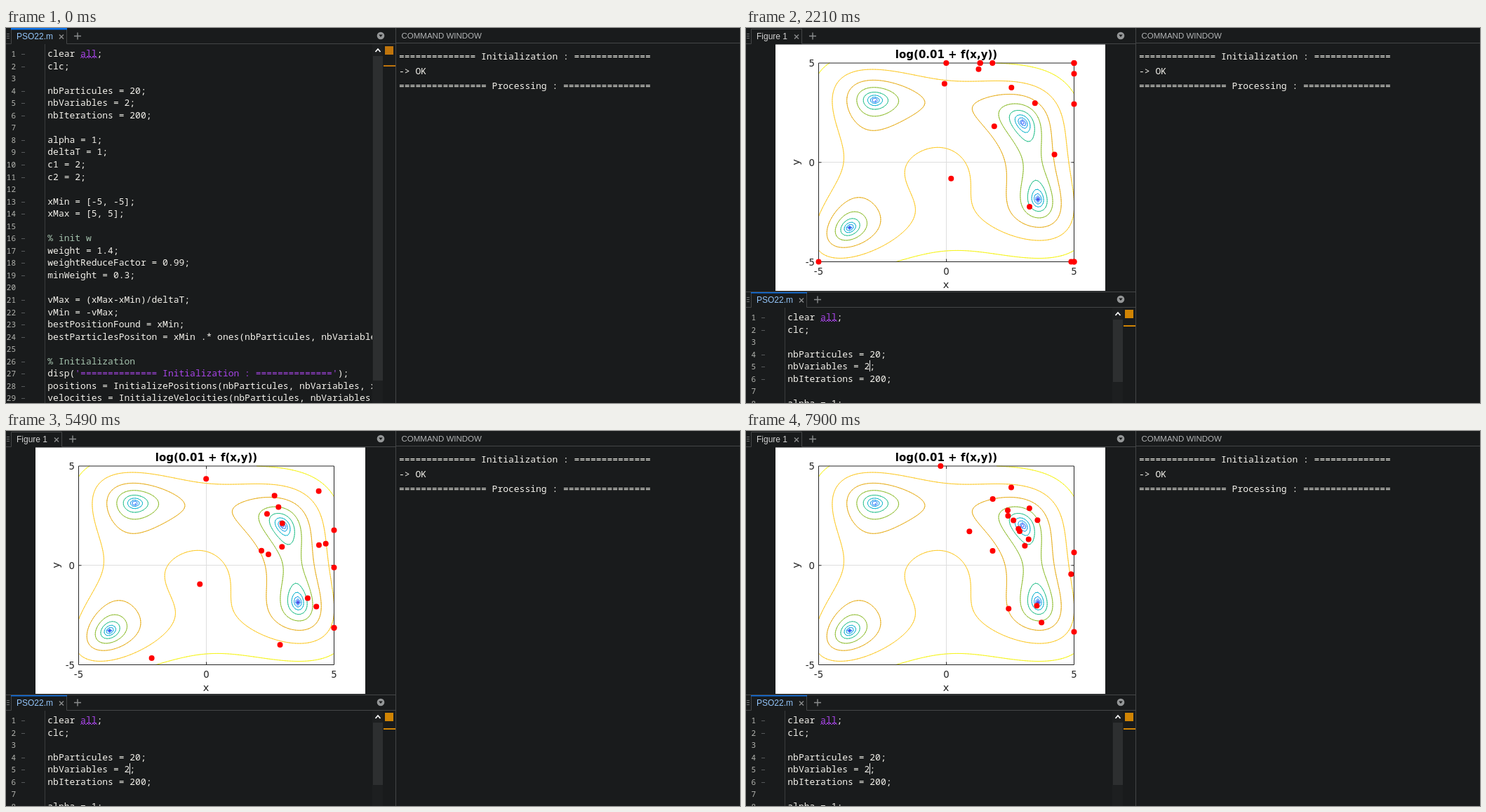
Write an HTML page that moves like this. It is 1046 by 535 pixels and loops after 8 s.

```html
<!DOCTYPE html>
<html lang="en">
<head>
<meta charset="utf-8">
<title>Particle swarm</title>
<style>
html, body { margin: 0; width: 100%; height: 100%; overflow: hidden; background: #191b1c; }
svg { display: block; width: 1046px; height: 535px; }
text { white-space: pre; }
.code { font: 13px "Noto Sans Mono", monospace; fill: #f4f2ec; }
.num { font: 11px "Noto Sans Mono", monospace; fill: #b4b5b0; text-anchor: end; }
.ui { font: 12px "Liberation Sans", sans-serif; fill: #d2d2d2; }
.tick { font: 13.3px "DejaVu Sans", sans-serif; fill: #262626; }
.title { font: bold 15px "DejaVu Sans", sans-serif; fill: #000; text-anchor: middle; }
.edge { fill: none; stroke: #444647; }
.icon { fill: none; stroke: #8b8d8e; stroke-width: 1.4; }
</style>
</head>
<body>
<svg id="stage" viewBox="0 0 1046 535"></svg>
<script>
const LOOP = 8000, DOCK = 930, OPEN = 1120, PLOT = 1228, SWARM = 1336;
const RUN = 1810, STEP = 141.5, BLINK = 600, COUNT = 20;
const BOX = { l: 103.5, r: 467.5, t: 50, b: 333.5 };
const MINIMA = [[3, 2], [3, 2], [3.58, -1.85]];
const CODE = `clear all;
clc;

nbParticules = 20;
nbVariables = 2;
nbIterations = 200;

alpha = 1;
deltaT = 1;
c1 = 2;
c2 = 2;

xMin = [-5, -5];
xMax = [5, 5];

% init w
weight = 1.4;
weightReduceFactor = 0.99;
minWeight = 0.3;

vMax = (xMax-xMin)/deltaT;
vMin = -vMax;
bestPositionFound = xMin;
bestParticlesPositon = xMin .* ones(nbParticules, nbVariables, 1);

% Initialization
disp('============== Initialization : ==============');
positions = InitializePositions(nbParticules, nbVariables, xMin, xMax);
velocities = InitializeVelocities(nbParticules, nbVariables, vMin);`.split('\n');
const LEVEL_COLORS = ['#3e26a8', '#4741e0', '#4367fd', '#2e87f7', '#1ba3e6', '#12b6ce',
  '#2cc28f', '#92bf35', '#e8b020', '#fdcb2c', '#f6f417'];

const toX = x => (BOX.l + (x + 5) / 10 * (BOX.r - BOX.l)).toFixed(2);
const toY = y => (BOX.b - (y + 5) / 10 * (BOX.b - BOX.t)).toFixed(2);
const clamp = v => Math.min(5, Math.max(-5, v));
const rand = (i, k) => {
  const v = Math.sin(i * 12.9898 + k * 78.233) * 43758.5453;
  return v - Math.floor(v);
};

// Particles swing around a minimum with shrinking reach, stopped by the walls
function particle(i, step) {
  const reach = 13 * Math.exp(-step / 22) * (0.1 + 2 * rand(i, 1) ** 2);
  return MINIMA[i % 3].map((home, axis) => {
    const phase = step * (0.8 + 0.6 * rand(i, 2 + axis)) + 2 * Math.PI * rand(i, 4 + axis);
    return clamp(home + reach * Math.sin(phase));
  });
}

// Marching squares over log(0.01 + f), f being Himmelblau's function
function contours() {
  const N = 99, at = i => i * 10 / N - 5;
  const height = (x, y) => Math.log(0.01 + (x * x + y - 11) ** 2 + (x + y * y - 7) ** 2);
  const z = Array.from({ length: N + 1 }, (_, j) =>
    Array.from({ length: N + 1 }, (_, i) => height(at(i), at(j))));
  return LEVEL_COLORS.map((color, n) => {
    const level = n - 4;
    let d = '';
    for (let j = 0; j < N; j++) for (let i = 0; i < N; i++) {
      const corners = [[i, j], [i + 1, j], [i + 1, j + 1], [i, j + 1]];
      const hits = [];
      corners.forEach(([ax, ay], k) => {
        const [bx, by] = corners[(k + 1) % 4];
        const za = z[ay][ax], zb = z[by][bx];
        if (za < level === zb < level) return;
        const s = (level - za) / (zb - za);
        hits.push(toX(at(ax + (bx - ax) * s)) + ' ' + toY(at(ay + (by - ay) * s)));
      });
      for (let k = 0; k + 1 < hits.length; k += 2) d += `M${hits[k]}L${hits[k + 1]}`;
    }
    return `<path d="${d}" stroke="${color}"/>`;
  }).join('');
}

const text = (x, y, cls, s, extra = '') => `<text x="${x}" y="${y}" class="${cls}" ${extra}>${s}</text>`;
const rect = (x, y, w, h, fill, extra = '') =>
  `<rect x="${x}" y="${y}" width="${w}" height="${h}" fill="${fill}" ${extra}/>`;
const path = (d, cls, extra = '') => `<path d="${d}" class="${cls}" ${extra}/>`;
const plus = x => path(`M${x - 5} 11.5h10M${x} 6.5v10`, 'icon');
const cross = x => path(`M${x - 3} 9.5l6 6m0 -6l-6 6`, 'icon');
const grip = () => [8, 11, 14].map(y => rect(1, y, 4, 1, '#6c6e6f')).join('');
const menu = () => '<circle cx="534" cy="11" r="5.3" fill="#949697"/>' +
  '<path d="M531.3 9.5h5.4l-2.7 3.6z" fill="#191b1c"/>';

function paint(line) {
  if (line[0] === '%') return `<tspan fill="#a5c3ae">${line}</tspan>`;
  return line.replace(/'.*'|\ball\b/, s => `<tspan fill="#a845e8">${s}</tspan>`);
}

function tab(width, label) {
  const r = 7.5 + width;
  return path(`M0 22.5H7.5V1.5H${r}V22.5H555`, 'edge') + text(15, 16, 'ui', label) +
    cross(r - 7.5) + plus(r + 15.5);
}

function editor() {
  const lines = CODE.map((line, i) => {
    const y = 41 + i * 17.55;
    const number = text(14, y, 'num', i + 1);
    if (!line) return number;
    return number + rect(22, Math.round(y - 4), 5, 1, '#55585a') +
      text(59.3, y, 'code', paint(line), 'clip-path="url(#page)"');
  }).join('');
  const wave = 'M106 43' + 'l2 -2l2 2'.repeat(6);
  return rect(0, 0, 555, 535, '#191b1c') + grip() + tab(79, 'PSO22.m') + menu() +
    rect(7, 0, 80, 2.5, '#0a70e8', 'id="focus"') +
    path('M55.5 23V535', 'edge', 'style="stroke:#3a3c3d"') + lines +
    path(wave, 'edge', 'style="stroke:#a845e8;stroke-width:.9"') +
    rect(522, 23, 15, 512, '#1d1f20') + rect(523, 40, 14, 463, '#2d2f30', 'id="thumb"') +
    path('M526.5 34l3.5 -4l3.5 4', 'icon', 'style="stroke:#fff;stroke-width:1.7"') +
    `<g id="marks">${rect(540, 26, 12, 12, 'inherit')}${rect(538, 53, 17, 2, 'inherit', 'id="warn"')}</g>` +
    rect(176, 98, 1, 16, '#e8e8e8', 'id="caret"');
}

function figure() {
  const { l, r, t, b } = BOX, cx = (l + r) / 2, cy = (t + b) / 2;
  const end = 'text-anchor="end"', mid = 'text-anchor="middle"';
  const marks = `M${l} ${t}H${r}V${b}H${l}ZM${cx} ${b}v-4M${cx} ${t}v4M${l} ${cy}h4M${r} ${cy}h-4`;
  const labels = [-5, 0, 5].map(v =>
    text(toX(v), 352, 'tick', v, mid) + text(98, +toY(v) + 5, 'tick', v, end)).join('');
  return `<g id="figure">${tab(72, 'Figure 1')}${rect(42, 23.5, 470, 351.5, '#fff')}<g id="plot">` +
    path(`M${cx} ${t}V${b}M${l} 191.5H${r}`, '', 'stroke="#dedede"') +
    `<g fill="none" stroke-linecap="round">${contours()}</g>` +
    path(marks, '', 'fill="none" stroke="#262626"') +
    text(cx, 43, 'title', 'log(0.01 + f(x,y))') + labels +
    text(285, 371, 'tick', 'x', mid + ' style="font-size:14.6px"') +
    text(0, 0, 'tick', 'y', mid + ' transform="translate(76 191.5) rotate(-90)" style="font-size:14.6px"') +
    '</g><g id="swarm" fill="#f00">' + '<circle r="4"/>'.repeat(COUNT) + '</g></g>';
}

function dock() {
  return rect(0, 0, 555, 377, '#191b1c') + grip() + menu() +
    `<g id="empty">${path('M0 22.5H555', 'edge')}${plus(22)}${rect(42, 24, 292, 149, '#1f2122')}</g>` +
    figure();
}

const bar = n => '='.repeat(n);
document.getElementById('stage').innerHTML =
  `<defs><clipPath id="page">${rect(56, 0, 466, 535, '#000')}</clipPath></defs>` +
  rect(0, 0, 1046, 535, '#191b1c') +
  `<g id="dock">${dock()}</g><g id="editor">${editor()}</g>` +
  path('M0 376.5H555', 'edge', 'id="split"') +
  rect(555, 0, 491, 535, '#191b1c') + path('M555.5 0V535M555 21.5H1046', 'edge') +
  text(563.5, 14.5, 'ui', 'COMMAND WINDOW', 'style="font-size:11.5px;fill:#b2b4b5"') +
  [`${bar(14)} Initialization : ${bar(14)}`, '-&gt; OK', `${bar(16)} Processing : ${bar(16)}`]
    .map((s, i) => text(560, 45 + i * 21, 'code', s)).join('');

const el = {};
document.querySelectorAll('[id]').forEach(node => { el[node.id] = node; });
const label = el.editor.querySelector('.ui');
const dots = [...el.swarm.children];
const show = (node, on) => node.setAttribute('display', on ? 'inline' : 'none');

function draw(t) {
  const docked = t >= DOCK, opened = t >= OPEN;
  const focused = !docked || opened;
  const blink = Math.floor((t - 80) / BLINK) % 2 === 1;
  const step = t < RUN ? 0 : 1 + Math.floor((t - RUN) / STEP);

  show(el.dock, docked);
  show(el.split, docked);
  show(el.empty, !opened);
  show(el.figure, opened);
  show(el.plot, t >= PLOT);
  show(el.swarm, t >= SWARM);

  el.editor.setAttribute('transform', `translate(0 ${docked ? 376 : 0})`);
  el.thumb.setAttribute('height', docked ? 89 : 463);
  el.warn.setAttribute('y', docked ? 48 : 53);
  el.marks.setAttribute('fill', docked ? '#d08404' : '#c0750c');
  show(el.focus, focused);
  label.style.fill = focused ? '#93c5fa' : '#d2d2d2';
  show(el.caret, opened ? blink : t >= 230);

  dots.forEach((dot, i) => {
    const [x, y] = particle(i, step);
    dot.setAttribute('cx', toX(x));
    dot.setAttribute('cy', toY(y));
  });
}

const start = performance.now();
function frame() {
  draw((performance.now() - start) % LOOP);
  requestAnimationFrame(frame);
}
draw(0);
requestAnimationFrame(frame);
</script>
</body>
</html>
```
